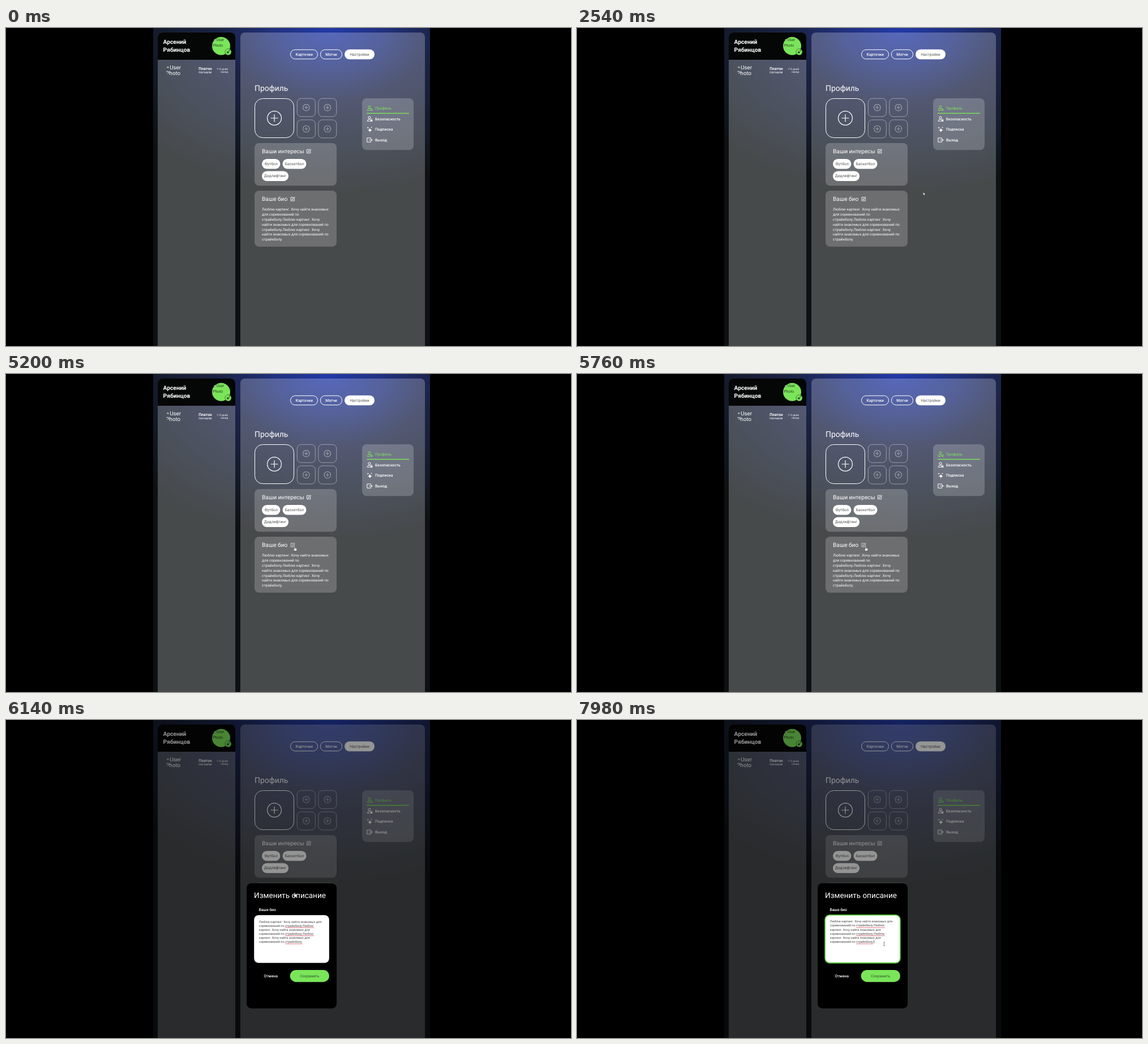
An HTML page for the animation above (8000 ms loop, 998x561 px).

```html
<!DOCTYPE html>
<html lang="ru">
<head>
<meta charset="utf-8">
<title>Профиль</title>
<style>
  html, body { margin: 0; width: 100%; height: 100%; overflow: hidden; background: #000; }
  svg { display: block; width: 100vw; height: 100vh; }
  text { font-family: Roboto, sans-serif; font-size: 6.8px; fill: #fff; text-rendering: geometricPrecision; white-space: pre; }
  .bold { font-weight: 700; }
  .medium { font-weight: 500; }
  .dark { fill: #555; }
  .line { fill: none; stroke: #fff; }
  .panel { fill: #fff; fill-opacity: .24; }
  .card { fill: #fff; fill-opacity: .2; }
  .white { fill: #fff; }
  .green { fill: #7ae55a; }
</style>
</head>
<body>
<svg viewBox="0 0 998 561">
  <defs>
    <radialGradient id="glow" gradientUnits="userSpaceOnUse" cx="0" cy="0" r="1"
      gradientTransform="translate(570 0) scale(430 290)">
      <stop offset="0" stop-color="#2239a8"/>
      <stop offset=".22" stop-color="#20317f"/>
      <stop offset=".45" stop-color="#1b2344"/>
      <stop offset=".75" stop-color="#131a28"/>
      <stop offset="1" stop-color="#0d1113"/>
    </radialGradient>
    <clipPath id="page"><rect x="260" width="489" height="561"/></clipPath>
    <clipPath id="avatar"><circle cx="297.5" cy="72" r="14.8"/></clipPath>
    <path id="star" d="M0-4Q.5-.5 4 0Q.5 .5 0 4Q-.5 .5-4 0Q-.5-.5 0-4Z"/>
    <g id="edit" fill="none" stroke="#fff" stroke-width=".9">
      <path d="M.8-3H-3.3V3.4H3V-.6"/>
      <path d="M-1.3 1.5L-.9-.1L2.8-3.6L3.8-2.6L.2 1.1Z"/>
    </g>
    <g id="person" fill="none" stroke-width="1">
      <circle cx="-.6" cy="-2.3" r="2.1"/>
      <path d="M.2 4H-4.2V2.8Q-3.6 .8-.6 .8Q.4 .8 1.2 1.2"/>
    </g>
    <g id="broken"><path d="M0 0H2L3 1V3H0Z" fill="#bbb"/><path d="M0 3L1.2 1.5L3 3Z" fill="#4a9a50"/></g>
  </defs>

  <g id="app" clip-path="url(#page)">
    <rect x="260" width="489" height="561" fill="url(#glow)"/>

    <path class="panel" d="M268 561V16a8 8 0 0 1 8-8H397a8 8 0 0 1 8 8V561Z"/>
    <path d="M268 56V16a8 8 0 0 1 8-8H397a8 8 0 0 1 8 8V56Z" fill="#050606"/>
    <g class="bold">
      <text x="277.5" y="28.3" style="font-size:10.3px">Арсений</text>
      <text x="277.5" y="41.7" style="font-size:10.3px">Рябинцов</text>
      <text x="340.3" y="74">Платон</text>
    </g>
    <circle class="green" cx="380" cy="31.7" r="16"/>
    <use href="#broken" x="367.5" y="20"/>
    <g style="--c:#26401f">
      <text x="371.5" y="23.3" style="fill:#26401f">User</text>
      <text x="365.3" y="32.6" style="fill:#26401f">Photo</text>
    </g>
    <circle class="green" cx="392.5" cy="42.3" r="5.6" stroke="#14200f" stroke-width=".5"/>
    <use href="#star" transform="translate(391.9 42.9) scale(.65)" fill="#1c2f17"/>
    <use href="#star" transform="translate(394.4 40) scale(.35)" fill="#1c2f17"/>

    <g clip-path="url(#avatar)">
      <use href="#broken" x="284.5" y="68"/>
      <text x="289.3" y="73.2" style="font-size:9.7px">User</text>
      <text x="282.5" y="82.7" style="font-size:9.7px">Photo</text>
    </g>
    <text x="340.3" y="79.5" style="font-size:6px">погнали</text>
    <g text-anchor="end">
      <text x="392" y="74" style="font-size:4.7px">113 дней</text>
      <text x="392" y="79" style="font-size:4.7px">назад</text>
    </g>

    <path class="panel" d="M414 561V16a8 8 0 0 1 8-8H732a8 8 0 0 1 8 8V561Z"/>
    <rect class="line" x="502.5" y="38.3" width="48" height="16.4" rx="8.2"/>
    <rect class="line" x="555.3" y="38.3" width="38.3" height="16.4" rx="8.2"/>
    <rect class="white" x="598" y="37.8" width="53" height="17.4" rx="8.7"/>
    <g text-anchor="middle">
      <text class="medium" x="526.7" y="48.8">Карточки</text>
      <text class="medium" x="574.4" y="48.8">Мэтчи</text>
      <text class="dark" x="624.5" y="48.8">Настройки</text>
    </g>

    <text x="439" y="111.3" style="font-size:13.9px">Профиль</text>
    <g id="slots"></g>

    <rect class="card" x="439" y="203" width="145" height="75.3" rx="8"/>
    <text x="452" y="220.8" style="font-size:10.2px">Ваши интересы</text>
    <use href="#edit" x="534.8" y="217.3"/>
    <g id="chips" text-anchor="middle"></g>

    <rect class="card" x="439" y="287" width="145" height="98.8" rx="8"/>
    <text x="452" y="305.2" style="font-size:10.2px">Ваше био</text>
    <use id="bioEdit" href="#edit" x="506.4" y="301.6"/>
    <g id="bio"></g>

    <rect class="card" x="629" y="124" width="91" height="91.3" rx="8"/>
    <rect class="green" x="637" y="149.8" width="75" height="1.4"/>
    <g class="medium">
      <text class="green" x="652" y="144" style="fill:#7ae55a;font-weight:400">Профиль</text>
      <text x="652" y="162.6">Безопасность</text>
      <text x="652" y="181.3">Подписка</text>
      <text x="652" y="200">Выход</text>
    </g>
    <use href="#person" x="642.5" y="141.5" stroke="#7ae55a"/>
    <circle cx="645.6" cy="144.3" r="1.5" fill="none" stroke="#7ae55a" stroke-width="1.1"/>
    <use href="#person" x="642.5" y="160.3" stroke="#fff"/>
    <path class="white" d="M643.6 162h3.6v3h-3.6Z"/>
    <path class="line" d="M644.4 162v-.7a1 1 0 0 1 2 0v.7" stroke-width=".7"/>
    <use class="white" href="#star" x="642.8" y="180.3"/>
    <use class="white" href="#star" transform="translate(639.2 176) scale(.45)"/>
    <use class="white" href="#star" transform="translate(645.5 175.3) scale(.35)"/>
    <path class="line" d="M644.5 195.8V194H637.8V201.2H644.5V199.4M641 197.6H647M645.2 195.7L647.1 197.6L645.2 199.5"/>
  </g>

  <rect id="shade" x="260" width="489" height="561"/>

  <g id="modal">
    <rect x="425.2" y="288" width="158.8" height="220.7" rx="8"/>
    <text x="438" y="313.6" style="font-size:13.5px">Изменить описание</text>
    <text class="medium" x="446.4" y="337.2">Ваше био</text>
    <rect id="field" class="white" x="438.2" y="344.2" width="132.6" height="84.3" rx="8" stroke-width="1.8"/>
    <g id="draft"></g>
    <path d="M493 366.3H544M493 380.6H544M493 394.9H523" stroke="#d83a4a" stroke-width=".7"/>
    <rect id="caret" x="524" y="388" width=".6" height="6" fill="#222"/>
    <text class="medium" x="455.5" y="453.7">Отмена</text>
    <rect class="green" x="501.7" y="441" width="69.3" height="21.2" rx="10.6"/>
    <text x="536.3" y="453.7" text-anchor="middle" style="fill:#31552a">Сохранить</text>
  </g>

  <g id="cursor">
    <path id="arrow" d="M0 0V5.4L1.3 4.3L2.2 6.3L3.1 5.9L2.2 4H3.9Z" fill="#fff" stroke="#222" stroke-width=".4"/>
    <path id="hand" d="M-.7 .4Q0-.5 .7 .4V2.7L3.2 3.3Q3.9 3.6 3.7 4.5L3.1 7.6H-.5L-2.3 4.9Q-2.2 3.8-.7 4.8Z" fill="#fff" stroke="#222" stroke-width=".4"/>
    <path id="beam" d="M-1.2-3H1.2M0-3V3M-1.2 3H1.2" fill="none" stroke="#333" stroke-width=".6"/>
  </g>
</svg>

<script>
const $ = id => document.getElementById(id);

// Photo slots: left, top, size, corner radius, opacity
$('slots').innerHTML = [
  [439.5, 124.5, 69, 14, 1],
  [514.3, 124.3, 32, 7, .42], [551.8, 124.3, 32, 7, .42],
  [514.3, 162, 32, 7, .42], [551.8, 162, 32, 7, .42]
].map(([x, y, size, radius, opacity]) => {
  const cx = x + size / 2, cy = y + size / 2, r = size * .18, arm = r * .52;
  return `<g class="line" opacity="${opacity}">
    <rect x="${x}" y="${y}" width="${size}" height="${size}" rx="${radius}"/>
    <circle cx="${cx}" cy="${cy}" r="${r}" stroke-width="1.2"/>
    <path d="M${cx - arm} ${cy}h${2 * arm}M${cx} ${cy - arm}v${2 * arm}" stroke-width="1.2"/></g>`;
}).join('');

$('chips').innerHTML = [
  [452, 231, 32.4, 'Футбол'], [488.5, 231, 42, 'Баскетбол'], [452, 252.4, 47, 'Дедлифтинг']
].map(([x, y, width, label]) =>
  `<rect class="white" x="${x}" y="${y}" width="${width}" height="17.6" rx="8.8"/>
   <text class="dark" x="${x + width / 2}" y="${y + 11}">${label}</text>`).join('');

function paragraph(id, x, y, leading, style, lines) {
  $(id).innerHTML = lines.map((line, i) =>
    `<text x="${x}" y="${y + i * leading}" style="${style}">${line}</text>`).join('');
}
paragraph('bio', 452, 322.2, 8.83, 'font-size:6.5px', [
  'Люблю картинг. Хочу найти знакомых', 'для соревнований по',
  'страйкболу.Люблю картинг. Хочу', 'найти знакомых для соревнований по',
  'страйкболу.Люблю картинг. Хочу', 'найти знакомых для соревнований по', 'страйкболу.'
]);
paragraph('draft', 446.8, 357.7, 7.13, 'font-size:5.5px;fill:#444', [
  'Люблю картинг. Хочу найти знакомых для', 'соревнований по страйкболу.Люблю',
  'картинг. Хочу найти знакомых для', 'соревнований по страйкболу.Люблю',
  'картинг. Хочу найти знакомых для', 'соревнований по страйкболу.'
]);

const LOOP = 8000, ENTER = 400, HOVER = 3950, OPEN = 5800, LEAVE = 6700, FOCUS = 7560;
const cursorPath = [
  [ENTER, 757, 335], [1500, 691, 275], [1900, 691, 275], [3240, 521, 306],
  [3550, 521, 306], [4050, 510, 304.5], [LEAVE, 510, 304.5], [7350, 542.5, 395], [LOOP, 542.5, 395]
];
const clamp = v => Math.min(1, Math.max(0, v));
const smooth = v => v * v * (3 - 2 * v);

function cursorAt(t) {
  const next = Math.max(1, cursorPath.findIndex(point => point[0] > t));
  const [t0, x0, y0] = cursorPath[next - 1], [t1, x1, y1] = cursorPath[next];
  const k = smooth(clamp((t - t0) / (t1 - t0)));
  return [x0 + (x1 - x0) * k, y0 + (y1 - y0) * k];
}

const show = (id, visible) => $(id).setAttribute('visibility', visible ? 'visible' : 'hidden');

function draw(now) {
  const t = now % LOOP;
  const open = 1 - (1 - clamp((t - OPEN) / 300)) ** 3;
  const scale = .5 + .5 * open;
  $('shade').setAttribute('opacity', .42 * open);
  $('modal').setAttribute('opacity', open);
  $('modal').setAttribute('transform', `translate(504.6 398.3) scale(${scale}) translate(-504.6 -398.3)`);

  const hovering = t >= HOVER && t < LEAVE;
  $('bioEdit').setAttribute('opacity', hovering ? .7 : 1);
  const focused = t >= FOCUS;
  $('field').setAttribute('stroke', focused ? '#68d94a' : 'none');
  $('draft').setAttribute('transform', `translate(0 ${focused ? -.4 : 0})`);
  show('caret', focused && (t - FOCUS) % 1000 < 500);

  const [x, y] = cursorAt(t);
  const typing = t > LEAVE && y > 344;
  $('cursor').setAttribute('transform', `translate(${x} ${y})`);
  show('hand', hovering);
  show('beam', typing);
  show('arrow', t >= ENTER && !hovering && !typing);
}

const start = performance.now();
function tick() {
  draw(performance.now() - start);
  requestAnimationFrame(tick);
}
tick();
</script>
</body>
</html>
```
